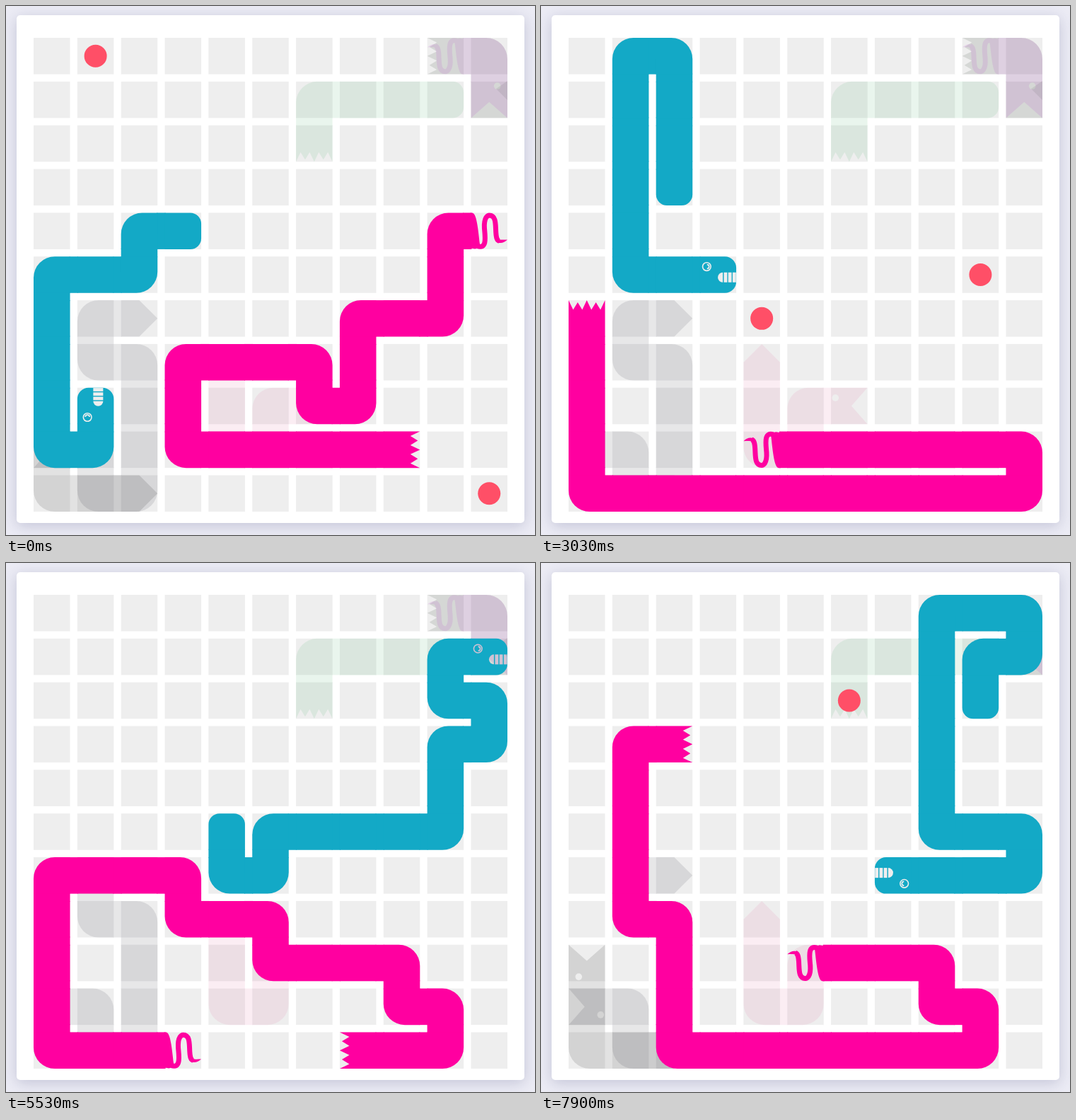
These frames come from a looping animation (748x748 px, 8000 ms). An HTML page with a canvas:

```html
<!DOCTYPE html>
<html lang="en">
<head>
<meta charset="utf-8">
<title>Snakes</title>
<style>
  html, body { margin: 0; width: 100%; height: 100%; overflow: hidden; background: #ececf5; }
  canvas { display: block; width: 748px; height: 748px; }
</style>
</head>
<body>
<canvas id="stage" width="748" height="748"></canvas>
<script>
const SIZE = 748, LOOP = 8000, TURN = 171, TURN_OFFSET = 22;
const CELLS = 11, CELL = 670 / 13, PITCH = CELL * 1.2, LEFT = 39, TOP = 45;
const DIRS = { R: [1, 0], D: [0, 1], L: [-1, 0], U: [0, -1] };

const makeLayer = () => {
  const canvas = document.createElement('canvas');
  canvas.width = canvas.height = SIZE;
  return canvas.getContext('2d');
};
const stage = document.getElementById('stage').getContext('2d');
const backdrop = makeLayer();
const scratch = makeLayer();

const px = col => LEFT + col * PITCH;
const py = row => TOP + row * PITCH;

function walk(x, y, moves) {
  const cells = [[x, y]];
  for (const m of moves) {
    x += DIRS[m][0];
    y += DIRS[m][1];
    cells.push([x, y]);
  }
  return cells;
}

function fillPoly(g, points) {
  g.beginPath();
  points.forEach(([x, y]) => g.lineTo(x, y));
  g.fill();
}

function fillDisc(g, x, y, r, from = 0, to = Math.PI * 2) {
  g.beginPath();
  g.arc(x, y, r, from, to);
  g.fill();
}

function fillRound(g, x, y, w, h, radii) {
  g.beginPath();
  g.roundRect(x, y, w, h, radii);
  g.fill();
}

function punch(g, draw) {
  g.globalCompositeOperation = 'destination-out';
  draw();
  g.globalCompositeOperation = 'source-over';
}

// Heads and tails are drawn in a cell-sized frame, pointing right.
const heads = {
  toothy(g) {
    fillRound(g, 0, 0, CELL, CELL, [0, 16, 16, 0]);
    punch(g, () => {
      fillRound(g, 25.5, 22.5, 7, 14, [7, 0, 0, 7]);
      for (const x of [34, 40.2, 46.4]) g.fillRect(x, 22.5, 4.8, 14);
      fillDisc(g, 9.8, 14.3, 6.6);
    });
    fillDisc(g, 9.8, 14.3, 5);
    punch(g, () => fillDisc(g, 10.2, 14.3, 3.8, -Math.PI / 2, Math.PI / 2));
    fillDisc(g, 10.2, 14.3, 2);
  },
  fangs(g) {
    const points = [[0, CELL], [0, 0]];
    for (let i = 0; i <= 8; i++) {
      const depth = i % 2 ? 13.5 : i % 4 ? 3 : 0;
      points.push([CELL - depth, CELL * i / 8]);
    }
    fillPoly(g, points);
  },
  notch(g) {
    fillPoly(g, [[0, 0], [CELL, 0], [CELL * .56, CELL / 2], [CELL, CELL], [0, CELL]]);
    punch(g, () => fillDisc(g, 6.2, 14.3, 4.8));
  }
};

const tails = {
  round(g) {
    fillRound(g, 0, 0, CELL, CELL, [0, 15.5, 15.5, 0]);
  },
  sharp(g) {
    fillPoly(g, [[0, 0], [CELL / 2, 0], [CELL, CELL / 2], [CELL / 2, CELL], [0, CELL]]);
  },
  flat(g) {
    g.fillRect(0, 0, CELL, CELL);
  },
  squiggle(g) {
    g.fill(new Path2D(`M-1 0H2C8 1 10 22 12.5 44C13 49 9 50 6 51L0 50L-1 ${CELL}Z`));
    g.lineWidth = 7;
    g.stroke(new Path2D('M9 47C23 52 20 34 19 22C18 6 24 3.7 26 3.7C36 4 34.5 17 35.3 28C35.8 36 37 39 40 40'));
    g.fill(new Path2D('M36 32C39 40 44 38 51.5 38C47 42.5 40 44.5 35 40Z'));
  }
};

function drawEnd(g, [col, row], [dx, dy], draw) {
  g.save();
  g.translate(px(col) + CELL / 2, py(row) + CELL / 2);
  g.rotate(Math.atan2(dy, dx));
  g.translate(-CELL / 2, -CELL / 2);
  draw(g);
  g.restore();
}

function drawSegment(g, prev, cell, next) {
  const sx = cell[0] * 2 - prev[0] - next[0];
  const sy = cell[1] * 2 - prev[1] - next[1];
  const corners = [[-1, -1], [1, -1], [1, 1], [-1, 1]];
  const radii = corners.map(([x, y]) => x === sx && y === sy ? 30 : 0);
  fillRound(g, px(cell[0]), py(cell[1]), CELL, CELL, radii);
}

function drawBridge(g, [ax, ay], [bx, by]) {
  const gap = PITCH - CELL;
  const x = px(Math.min(ax, bx)), y = py(Math.min(ay, by));
  if (ax !== bx) g.fillRect(x + CELL - 1, y, gap + 2, CELL);
  else g.fillRect(x, y + CELL - 1, CELL, gap + 2);
}

function drawSnake(target, cells, { color, head, tail }, alpha = 1) {
  const g = scratch, last = cells.length - 1;
  const step = (a, b) => [b[0] - a[0], b[1] - a[1]];
  g.clearRect(0, 0, SIZE, SIZE);
  g.fillStyle = g.strokeStyle = color;
  for (let i = 0; i < last; i++) {
    drawBridge(g, cells[i], cells[i + 1]);
    if (i) drawSegment(g, cells[i - 1], cells[i], cells[i + 1]);
  }
  drawEnd(g, cells[0], step(cells[1], cells[0]), tails[tail]);
  drawEnd(g, cells[last], step(cells[last - 1], cells[last]), heads[head]);
  target.globalAlpha = alpha;
  target.drawImage(g.canvas, 0, 0);
  target.globalAlpha = 1;
}

const ghosts = [
  { at: [2, 6], moves: 'LDRDDDLUL', color: 'rgb(28,28,46)', head: 'notch', tail: 'sharp' },
  { at: [2, 10], moves: 'LLUU', color: '#000', head: 'notch', tail: 'sharp', alpha: .11 },
  { at: [4, 7], moves: 'DDRUR', color: 'rgb(222,88,150)', head: 'notch', tail: 'sharp' },
  { at: [9, 1], moves: 'LLLD', color: 'rgb(50,168,88)', head: 'fangs', tail: 'round' },
  { at: [10, 1], moves: 'UL', color: 'rgb(10,28,10)', head: 'fangs', tail: 'flat' },
  { at: [9, 0], moves: 'RD', color: 'rgb(172,20,200)', head: 'notch', tail: 'squiggle' }
];

// Eating keeps the tail still on the following turn.
const snakes = [
  {
    cells: walk(3, 4, 'LDLLDDDDRU' +
      'UURUUUUUULDDDDDRRRDRURRRRUURULURULLDDDDDRRDLLL'),
    length: 11, meals: [10, 19, 25, 28, 32, 43],
    color: '#13a9c6', head: 'toothy', tail: 'round'
  },
  {
    cells: walk(10, 4, 'LDDLLDDLULLLDDRRRRR' +
      'RRDLLLLLLLLLLUUUURRRDRRDRRRDRDLLLLLLLUUULUUUUR'),
    length: 20, meals: [3, 13, 28],
    color: '#ff00a0', head: 'fangs', tail: 'squiggle'
  }
];

// column, row, turn of appearance, turn of disappearance
const foods = [
  [1, 0, 0, 10], [10, 10, 0, 3], [0, 10, 3, 13], [9, 5, 4, 25], [4, 6, 12, 19],
  [8, 9, 22, 28], [10, 3, 23, 28], [10, 1, 30, 32], [10, 6, 37, 43], [6, 2, 45, 99]
];

function paintBackdrop() {
  const g = backdrop;
  g.fillStyle = '#ececf5';
  g.fillRect(0, 0, SIZE, SIZE);
  g.save();
  g.shadowColor = 'rgba(50,55,110,.22)';
  g.shadowBlur = 20;
  g.shadowOffsetY = 4;
  g.fillStyle = '#fff';
  fillRound(g, 15, 13, 718, 718, 5);
  g.restore();
  g.fillStyle = '#eee';
  for (let row = 0; row < CELLS; row++)
    for (let col = 0; col < CELLS; col++) g.fillRect(px(col), py(row), CELL, CELL);
  for (const ghost of ghosts)
    drawSnake(g, walk(...ghost.at, ghost.moves), ghost, ghost.alpha || .1);
  g.fillStyle = 'rgba(0,20,0,.07)';
  fillPoly(g, [[693, 117], [709, 106], [709, 133]]);
}

function paint(turn) {
  stage.drawImage(backdrop.canvas, 0, 0);
  stage.fillStyle = '#ff4f67';
  for (const [col, row, from, to] of foods)
    if (turn >= from && turn < to)
      fillDisc(stage, px(col) + CELL / 2, py(row) + CELL / 2, 16);
  for (const snake of snakes) {
    const tail = turn - snake.meals.filter(meal => meal < turn).length;
    drawSnake(stage, snake.cells.slice(tail, snake.length + turn), snake);
  }
}

let shown = -1;
const start = performance.now();
function frame() {
  const t = (performance.now() - start) % LOOP;
  const tick = Math.floor((t + 4) * .03) / .03;
  const turn = Math.min(46, Math.floor((tick + TURN_OFFSET) / TURN));
  if (turn !== shown) paint(shown = turn);
  requestAnimationFrame(frame);
}

paintBackdrop();
frame();
</script>
</body>
</html>
```
